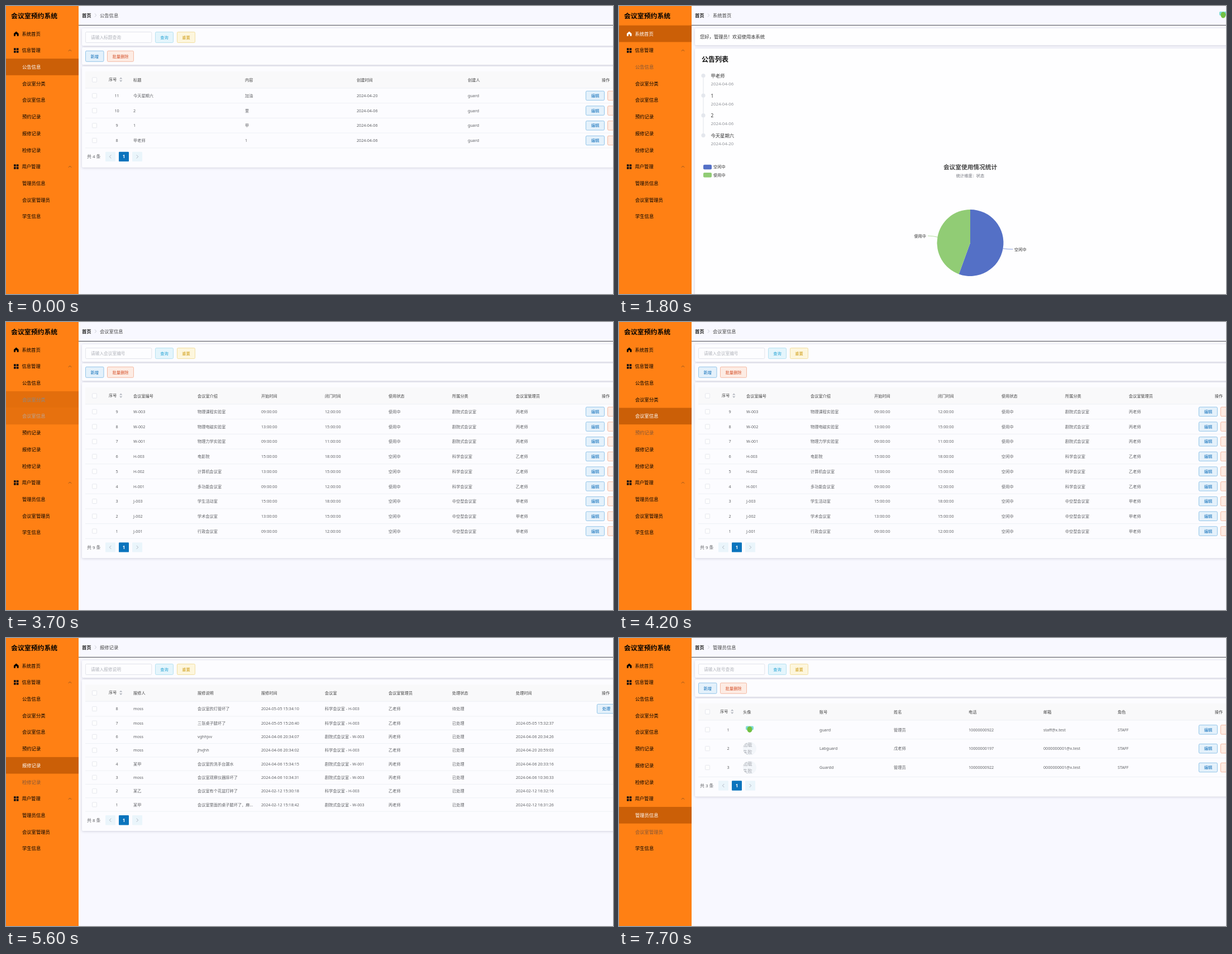
Recreate the animation shown at these times as an HTML page. Size 1087 by 515 pixels, loop 8 s.

```html
<!DOCTYPE html>
<html lang="zh">
<head>
<meta charset="utf-8">
<title>会议室预约系统</title>
<style>
html, body { margin: 0; width: 100%; height: 100%; overflow: hidden; background: #f8f8ff; }
svg { display: block; width: 100%; height: 100%; font-family: "Noto Sans", "Noto Sans CJK SC", "Noto Sans CJK JP", "Noto Sans CJK", sans-serif; }
.card { fill: #fcfcff; filter: drop-shadow(0 1px 2px rgba(20, 20, 50, .17)); }
.white { fill: #fefeff; }
</style>
</head>
<body>
<svg id="stage" viewBox="0 0 1087 515"></svg>
<script>
const LOOP = 8000, STEP = 100;
const clamp = v => Math.max(0, Math.min(1, v));
const mix = (a, b, p) => a.map((v, i) => v + (b[i] - v) * p);
const rgb = c => `rgb(${c.map(Math.round)})`;

// Drawing helpers; text is placed by its vertical centre.
const text = (x, cy, str, size = 7.2, fill = '#606266', more = '') =>
  `<text x="${x}" y="${cy + size * .37}" font-size="${size}" fill="${fill}" ${more}>${str}</text>`;
const rect = (x, y, w, h, fill, more = '') =>
  `<rect x="${x}" y="${y}" width="${w}" height="${h}" fill="${fill}" ${more}/>`;
const line = (d, color, width = .8, more = '') =>
  `<path d="${d}" fill="none" stroke="${color}" stroke-width="${width}" ${more}/>`;
const card = (y, bottom, cls = '') => `<rect class="card ${cls}" x="136" y="${y}" width="1000" height="${bottom - y}" rx="2"/>`;
const MID = 'text-anchor="middle"', BOLD = 'font-weight="700"', SEMI = 'font-weight="500"';

const tones = {
  cyan: ['#e4f5fc', '#a9dcef', '#2ba6d6'],
  gold: ['#fdf6dd', '#efd98e', '#cf9c14'],
  blue: ['#e4f1fb', '#7db9e4', '#0b6cb8'],
  red: ['#fdece4', '#f2ab90', '#d5522b'],
};
const button = (x, cy, w, h, label, tone) => {
  const [fill, border, ink] = tones[tone];
  return rect(x + .5, cy - h / 2, w - 1, h, fill, `stroke="${border}" stroke-width=".8" rx="1.8"`) +
    text(x + w / 2, cy, label, 7.3, ink, `${MID} ${SEMI}`);
};
const checkbox = cy => rect(154.5, cy - 4, 8, 8, '#fff', 'stroke="#dcdfe6" stroke-width=".7" rx="1"');

const crumb = title => text(136, 16.5, '首页', 8.3, '#222', BOLD) +
  line('M159 13.5l2.6 3-2.6 3', '#b4b8c0', .7) + text(168, 16.5, title, 8.3, '#444');

const pager = (cy, total) => text(145, cy, `共 ${total} 条`, 7.9) +
  rect(178, cy - 8.7, 18, 17.4, '#eaf5fb', 'rx="1.2"') +
  rect(202, cy - 8.7, 18, 17.4, '#0a74bd', 'rx="1.2"') +
  rect(226, cy - 8.7, 18, 17.4, '#eaf5fb', 'rx="1.2"') +
  line(`M188.3 ${cy - 3}l-3 3 3 3M233.7 ${cy - 3}l3 3-3 3`, '#a0a8b4') +
  text(211, cy, '1', 8, '#fff', `${MID} ${BOLD}`);

const editActions = cy => button(1038, cy, 34, 16.5, '编辑', 'blue') + button(1077, cy, 34, 16.5, '删除', 'red');

const portrait = (x, cy) => rect(x - 7, cy - 6, 14, 7, '#7fdcd6', 'rx="2"') +
  `<ellipse cx="${x}" cy="${cy}" rx="4.5" ry="5.5" fill="#72c043"/>`;
const brokenImage = (x, cy, i) => `<clipPath id="round${i}"><circle cx="${x}" cy="${cy}" r="12"/></clipPath>
  <g clip-path="url(#round${i})">${rect(x - 12, cy - 12, 24, 24, '#f3f6fa')}
  ${text(x - 12, cy - 6.7, '加载', 8.3, '#a8abb2')}${text(x - 12, cy + 6.7, '失败', 8.3, '#a8abb2')}</g>`;

function tablePage({ title, hint, add = true, xs, heads, rows, height = () => 26.7, actions = editActions, shift = 0, extra = () => '' }) {
  const top = add ? 117 : 83.3, firstRow = top + 30;
  const sizes = rows.map((_, i) => height(i));
  const bottom = firstRow + sizes.reduce((a, b) => a + b, 0);
  const headY = top + 15;
  let out = crumb(title) + card(40, 71) +
    rect(142.4, 46.5, 118.4, 19, '#fff', 'fill-opacity=".5" stroke="#dcdfe6" stroke-width=".8" rx="2"') +
    text(152, 56, hint, 7.7, '#b0b3ba') +
    button(267, 56, 33, 19, '查询', 'cyan') + button(306, 56, 33, 19, '重置', 'gold');
  if (add) out += card(74, 105) + button(142, 89.8, 33.5, 19, '新增', 'blue') + button(181, 89.8, 48, 19, '批量删除', 'red');
  out += card(top - 9, bottom + 35) + rect(142, top, 960, 30, '#f9f9fa') +
    line(`M142 ${firstRow}H1087`, '#e9ebf1', .7) + checkbox(headY) +
    text(184 + shift, headY - .8, '序号', 7.2, '#444', SEMI) +
    `<path d="M${203 + shift} ${headY - 1.5}l2.7-3 2.7 3zm0 2.2l2.7 3 2.7-3z" fill="#b4b8c0"/>`;
  heads.split('|').forEach((h, i) => out += text(xs[i], headY, h, 7.2, '#444', SEMI));
  if (actions) out += text(1074, headY, '操作', 7.2, '#444', `${MID} ${SEMI}`);
  let y = firstRow;
  rows.forEach((row, i) => {
    const cy = y + sizes[i] / 2, [id, ...cells] = row.split('|');
    y += sizes[i];
    out += checkbox(cy) + text(198.5 + shift, cy, id, 7.2, '#606266', MID);
    cells.forEach((cell, c) => {
      const parts = cell.split('\n');
      parts.forEach((part, k) => out += text(xs[c], cy + (k - (parts.length - 1) / 2) * 13.5, part));
    });
    if (actions) out += actions(cy, i);
    out += extra(cy, i) + line(`M142 ${y}H1087`, '#e9ebf1', .7);
  });
  return out + pager(bottom + 15.6, rows.length);
}

const PIE = { x: 629, y: 423.5, r: 59.5, split: 200 };
const sector = (from, to) => {
  if (to <= from) return '';
  const at = deg => {
    const a = deg * Math.PI / 180;
    return `${PIE.x + PIE.r * Math.sin(a)} ${PIE.y - PIE.r * Math.cos(a)}`;
  };
  return `M${PIE.x} ${PIE.y}L${at(from)}A${PIE.r} ${PIE.r} 0 ${+(to - from > 180)} 1 ${at(to)}Z`;
};

function homePage() {
  const notices = ['甲老师|2024-04-06', '1|2024-04-06', '2|2024-04-06', '今天星期六|2024-04-20'];
  let out = crumb('系统首页') + portrait(1082, 16) + card(40, 70, 'white') +
    text(145, 55.3, '您好，管理员！欢迎使用本系统', 8.3, '#333') +
    card(76, 530, 'white') + text(148, 95.5, '公告列表', 12, '#111', BOLD) +
    line('M151 124V231', '#e4e7ed', 1.2);
  notices.forEach((n, i) => {
    const [title, date] = n.split('|'), y = 124.5 + i * 35.6;
    out += `<circle cx="151" cy="${y}" r="3.6" fill="#e4e7ed"/>` +
      text(164.5, y + .5, title, 8.3, '#333') + text(164.5, y + 14.6, date, 7.8, '#909399');
  });
  [['空闲中', '#5470c6'], ['使用中', '#91cc75']].forEach(([label, color], i) => {
    const y = 288 + i * 14.2;
    out += rect(151, y - 4.2, 15, 8.4, color, 'rx="2"') + text(169, y - .3, label, 7.2, '#333');
  });
  return out + text(629, 288.5, '会议室使用情况统计', 10.7, '#464646', `${MID} ${BOLD}`) +
    text(629, 303.2, '统计维度：状态', 7.2, '#6e7079', MID) +
    '<path id="free" fill="#5470c6"/><path id="busy" fill="#91cc75"/><g id="labels">' +
    line('M570.4 413.2Q562 411 553 411', '#91cc75', .7) + text(550, 411, '使用中', 7.2, '#333', 'text-anchor="end"') +
    line('M687.6 433.8Q696 435 705.5 435', '#5470c6', .7) + text(708, 435, '空闲中', 7.2, '#333') + '</g>';
}

const sevenCols = [228, 343, 457, 571, 685, 799, 913];
const pages = {
  home: homePage(),
  notice: tablePage({
    title: '公告信息', hint: '请输入标题查询', xs: [228, 428, 628, 827], heads: '标题|内容|创建时间|创建人',
    rows: ['11|今天星期六|加油|2024-04-20|guard', '10|2|里|2024-04-06|guard', '9|1|甲|2024-04-06|guard', '8|甲老师|1|2024-04-06|guard'],
  }),
  category: tablePage({
    title: '会议室分类', hint: '请输入分类名称', xs: [228, 495, 761], heads: '分类名称|分类描述|会议室管理员',
    rows: ['4|教室型会议室|上课用的|甲老师', '3|科学会议室|这是科学拓展的会议室|乙老师',
      '2|剧院式会议室|表演用的会议室|丙老师', '1|中空型会议室|小型会议室|甲老师'],
  }),
  room: tablePage({
    title: '会议室信息', hint: '请输入会议室编号', xs: sevenCols,
    heads: '会议室编号|会议室介绍|开始时间|闭门时间|使用状态|所属分类|会议室管理员',
    rows: [
      '9|W-003|物理课程实验室|09:00:00|12:00:00|使用中|剧院式会议室|丙老师',
      '8|W-002|物理电磁实验室|13:00:00|15:00:00|使用中|剧院式会议室|丙老师',
      '7|W-001|物理力学实验室|09:00:00|11:00:00|使用中|剧院式会议室|丙老师',
      '6|H-003|电影院|15:00:00|18:00:00|空闲中|科学会议室|乙老师',
      '5|H-002|计算机会议室|13:00:00|15:00:00|空闲中|科学会议室|乙老师',
      '4|H-001|多功能会议室|09:00:00|12:00:00|使用中|科学会议室|乙老师',
      '3|J-003|学生活动室|15:00:00|18:00:00|空闲中|中空型会议室|甲老师',
      '2|J-002|学术会议室|13:00:00|15:00:00|空闲中|中空型会议室|甲老师',
      '1|J-001|行政会议室|09:00:00|12:00:00|空闲中|中空型会议室|甲老师'],
  }),
  booking: tablePage({
    title: '预约记录', hint: '请输入会议室编号', add: false, xs: [228, 315, 434, 553, 671, 790, 908],
    heads: '预约人|会议室|会议室管理员|开始时间|结束时间|审核状态|使用状态',
    rows: Array.from({ length: 10 }, (_, i) => {
      const day = `2024-0${i < 4 ? 5 : 4}-${20 - i}`, [kind, code, keeper] = i % 2 ? ['剧院式', 'W', '丙'] : ['科学', 'H', '乙'];
      return `${10 - i}|${i < 6 ? 'moss' : '某甲'}|${kind}会议室 - ${code}-003|${keeper}老师|${day} 09:00:00|${day} 12:00:00|审核通过|已结束`;
    }),
    height: i => i === 0 || i > 7 ? 26.7 : 24.3,
    actions: (cy, i) => i === 0 || i > 7 ? editActions(cy) : '',
  }),
  repair: tablePage({
    title: '报修记录', hint: '请输入报修说明', add: false, xs: sevenCols,
    heads: '报修人|报修说明|报修时间|会议室|会议室管理员|处理状态|处理时间',
    rows: [
      '8|moss|会议室的灯管坏了|2024-05-05 15:34:10|科学会议室 - H-003|乙老师|待处理',
      '7|moss|三张桌子腿坏了|2024-05-05 15:26:40|科学会议室 - H-003|乙老师|已处理|2024-05-05 15:32:37',
      '6|moss|vghhjvv|2024-04-06 20:34:07|剧院式会议室 - W-003|丙老师|已处理|2024-04-06 20:34:26',
      '5|moss|jhvjhh|2024-04-06 20:34:02|科学会议室 - H-003|乙老师|已处理|2024-04-20 20:59:03',
      '4|某甲|会议室的洗手台漏水|2024-04-06 15:34:15|剧院式会议室 - W-001|丙老师|已处理|2024-04-06 20:33:16',
      '3|moss|会议室观察仪器摔坏了|2024-04-06 10:34:31|剧院式会议室 - W-003|丙老师|已处理|2024-04-06 10:36:33',
      '2|某乙|会议室有个花盆打碎了|2024-02-12 15:30:18|科学会议室 - H-003|乙老师|已处理|2024-02-12 16:32:16',
      '1|某甲|会议室里面的桌子腿坏了，麻...|2024-02-12 15:18:42|剧院式会议室 - W-003|丙老师|已处理|2024-02-12 16:31:26'],
    height: i => i ? 24.3 : 26.7,
    actions: (cy, i) => i ? '' : button(1058, cy, 34, 16.5, '处理', 'blue'),
  }),
  service: tablePage({
    title: '检修记录', hint: '请输入检修人姓名', add: false, xs: [228, 361, 489, 618, 747, 876, 1005],
    heads: '检修人|联系电话|检修说明|检修时间|检修单位|会议室|报修说明',
    rows: [
      '10|己师傅|10000000126|会议室桌子坏了|2024-05-07 15:00:00|会议室修理中心|H-003|三张桌子腿坏了',
      '9|己老|10000000126|会议室桌子坏了|2024-04-01 00:00:00|会议室修理中心|H-003|jhvjhh',
      '8||||||W-003|vghhjvv',
      '7|xyxy|152|125|2024-04-15 14:00:00||W-001|会议室的洗手台漏水',
      '6|己师傅|10000000573|会议室观察仪器摔坏了|2024-04-08 10:00:00|会议室检修中心|W-003|会议室观察仪器摔坏了',
      '5|庚师傅|10000000200|22222|2024-02-12 16:32:10|66666|H-003|会议室有个花盆打碎了',
      '4|辛师傅|10000000300|11|2024-02-12 16:31:22|111|W-003|会议室里面的桌子腿坏了，麻烦修一\n下'],
    height: i => i < 6 ? 24.3 : 37.3, actions: null,
  }),
  manager: tablePage({
    title: '管理员信息', hint: '请输入账号查询', shift: -3, xs: [222, 359, 492, 626, 760, 893],
    heads: '头像|账号|姓名|电话|邮箱|角色',
    rows: ['1||guard|管理员|10000000922|staff@x.test|STAFF', '2||Labguard|戊老师|10000000197|0000000001@x.test|STAFF',
      '3||Guardd|管理员|10000000922|0000000001@x.test|STAFF'],
    height: () => 33.8,
    extra: (cy, i) => i ? brokenImage(234, cy, i) : portrait(234, cy - .5),
  }),
};

const menu = ['系统首页', '信息管理', '公告信息', '会议室分类', '会议室信息', '预约记录', '报修记录', '检修记录', '用户管理', '管理员信息', '会议室管理员', '学生信息'];
const rowTop = i => 34.7 + i * 29.7;
const sidebar = rect(0, 0, 130, 515, '#ff8014') + text(9, 17.3, '会议室预约系统', 11.9, '#000', BOLD) +
  menu.map((label, i) => {
    const cy = rowTop(i) + 14.9, isGroup = i === 1 || i === 8;
    let icon = '';
    if (i === 0) icon = `<path id="house" d="M18.3 ${cy - 4}l4.3 3.6v4.6h-2.9v-3.2h-2.8v3.2H14v-4.6z"/>`;
    if (isGroup) icon = [[14, -4], [18.8, -4], [14, .7], [18.8, .7]].map(([x, dy]) => rect(x, cy + dy, 3.7, 3.7, '#111')).join('') +
      line(`M112 ${cy + 1.5}l2.5-2.6 2.5 2.6`, '#7a4a20', .8);
    return rect(0, rowTop(i), 130, 29.7, '#cb5f07', `id="bar${i}" opacity="0"`) + icon +
      text(i < 2 || isGroup ? 28.5 : 29, cy, label, 8.3, '#000', `id="item${i}"`);
  }).join('');

const stage = document.getElementById('stage');
stage.innerHTML = rect(0, 0, 1087, 515, '#f8f8ff') + line('M130 34.4H1087', '#4a4a50', 1) +
  Object.entries(pages).map(([key, body]) => `<g id="${key}">${body}</g>`).join('') + sidebar;
const el = id => document.getElementById(id);

// [time, page, menu row]
const visits = [[-1000, 'notice', 2], [700, 'home', 0], [1900, 'notice', 2], [2900, 'category', 3], [3700, 'room', 4],
  [4500, 'booking', 5], [5300, 'repair', 6], [6100, 'service', 7], [7300, 'manager', 9]];
// [menu row, pointer enters, row is opened]
const hovers = [[0, 400, 700], [2, 1600, 1900], [3, 2100, 2900], [4, 3300, 3700], [5, 4100, 4500],
  [6, 4800, 5300], [7, 5500, 6100], [9, 6900, 7300], [10, 7600, 8000]];
const BLACK = [0, 0, 0], WHITE = [255, 255, 255], HOVER = [130, 86, 56];

function draw(t) {
  const now = visits.findLastIndex(v => v[0] <= t);
  const [since, page, row] = visits[now], previous = now ? visits[now - 1][2] : -1;
  const fade = clamp((t - since + 140) / 300);
  for (const key in pages) el(key).style.display = key === page ? '' : 'none';

  menu.forEach((_, i) => {
    const active = i === row ? fade : i === previous ? 1 - fade : 0;
    const hover = hovers.find(h => h[0] === i && t >= h[1] && t < h[2] + 300);
    const base = hover ? mix(BLACK, HOVER, clamp((t - hover[1] + 100) / 200)) : BLACK;
    const color = rgb(mix(base, WHITE, active));
    el('bar' + i).setAttribute('opacity', active);
    el('item' + i).setAttribute('fill', color);
    if (i === 0) el('house').setAttribute('fill', color);
  });
  if (t >= 6800 && t < 7000) el('bar8').setAttribute('opacity', t < 6900 ? .3 : .15);

  const p = clamp((t - 640) / 1000);
  const sweep = 360 * (p < .5 ? 4 * p ** 3 : 1 - (2 - 2 * p) ** 3 / 2);
  el('free').setAttribute('d', sector(0, Math.min(PIE.split, sweep)));
  el('busy').setAttribute('d', sector(PIE.split, sweep));
  el('labels').setAttribute('opacity', p);
}

const start = performance.now();
function tick() {
  const t = (performance.now() - start) % LOOP;
  draw(Math.floor(t / STEP) * STEP);
  requestAnimationFrame(tick);
}
tick();
</script>
</body>
</html>
```
